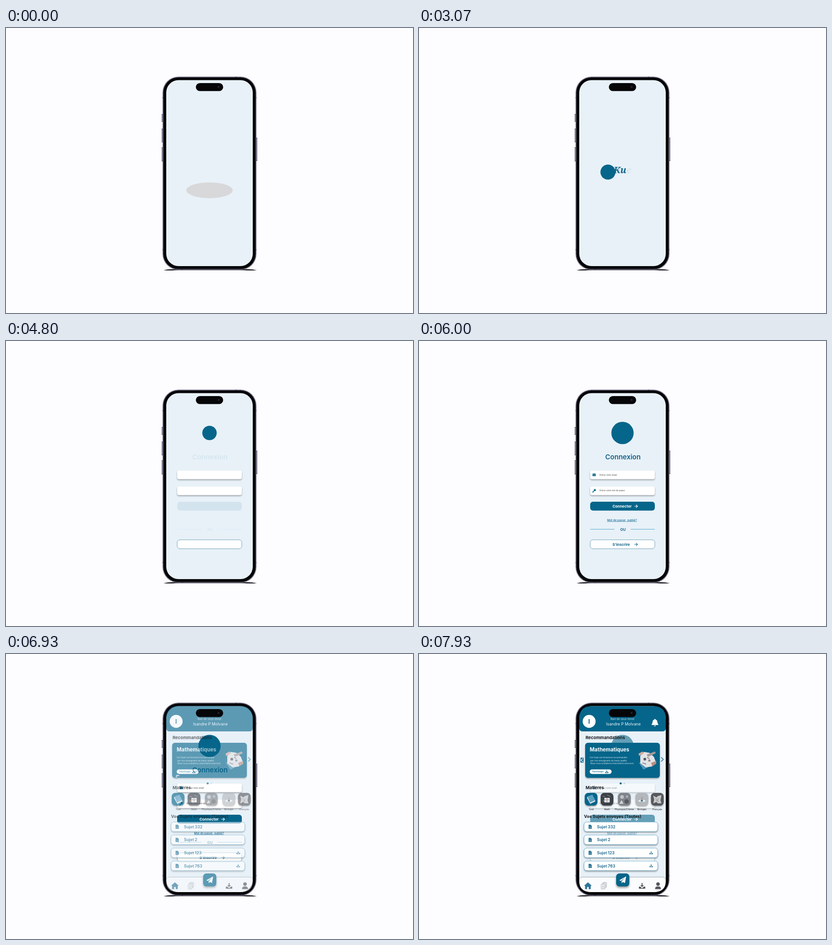
Animation, 894 px wide and 626 px high, one loop 8000 ms. Source, as an HTML page:

```html
<!DOCTYPE html>
<html lang="fr">
<head>
<meta charset="utf-8">
<title>Application mobile</title>
<style>
  html, body { margin: 0; width: 100%; height: 100%; overflow: hidden; background: #fdfcff; }
  svg { display: block; font-family: Inter, "Open Sans", sans-serif; }
  .soft { filter: drop-shadow(0 2px 1.5px #0005); }
  .script { font: italic bold 20px "Noto Serif", serif; fill: #14688e; }
</style>
</head>
<body>
<svg id="stage" width="894" height="626" viewBox="0 0 894 626"></svg>
<script>
const BLUE = '#06658a', INK = '#16181c', LOOP = 8000;
const stage = document.getElementById('stage');

// Markup helpers
const text = (x, y, size, weight, fill, str, anchor = 'start', extra = '') =>
  `<text x="${x}" y="${y}" font-size="${size}" font-weight="${weight}" fill="${fill}" text-anchor="${anchor}" ${extra}>${str}</text>`;
const rect = (x, y, w, h, r, fill, extra = '') =>
  `<rect x="${x}" y="${y}" width="${w}" height="${h}" rx="${r}" fill="${fill}" ${extra}/>`;
const circle = (x, y, r, fill, extra = '') =>
  `<circle cx="${x}" cy="${y}" r="${r}" fill="${fill}" ${extra}/>`;
const path = (d, fill, extra = '') => `<path d="${d}" fill="${fill}" ${extra}/>`;
const line = (d, stroke, width, extra = '') =>
  path(d, 'none', `stroke="${stroke}" stroke-width="${width}" ${extra}`);
const at = (x, y, scale, body) => `<g transform="translate(${x} ${y}) scale(${scale})">${body}</g>`;

// Icons, drawn around their own centre
const arrow = (x, y, color) =>
  line(`M${x} ${y}h6.5m-3-3l3 3l-3 3`, color, 1.1, 'stroke-linecap="round" stroke-linejoin="round"');
const download = (x, y, scale, color) => at(x, y, scale,
  path('M-1-6h2v5h3l-4 4l-4-4h3z', color) + path('M-7 2h3l4 3.5l4-3.5h3v4.5h-14z', color));
const documentIcon = (x, y) =>
  path(`M${x - 3.5} ${y - 4.5}h4.5l2.5 2.5v6.5h-7z`, '#2d7698') +
  line(`M${x - 1.8} ${y + .5}h3.6m-3.6 1.8h3.6`, '#d5e5ee', .5);

const phone = `
  ${path('M346 532Q358 529 372 530H522Q538 529 551 532Q538 533 522 532H372Q358 533 346 532z', '#15141c')}
  ${[[342, 189, 17], [342, 221, 30], [342, 262, 31], [549, 241, 51]].map(([x, y, h]) =>
    rect(x, y, 3, h, 1, '#77758a') + rect(x, y, 3, 1, 0, '#25242e') + rect(x, y + h - 1, 3, 1, 0, '#25242e')).join('')}
  ${rect(343.8, 106.8, 206.4, 424.4, 35, '#7b798d')}
  ${rect(345.6, 108.6, 202.8, 420.8, 33, '#050508')}
  ${[[343.8, 152], [548.6, 152], [343.8, 486], [548.6, 486]].map(([x, y]) => rect(x, y, 1.6, 2, 0, '#3c3b48')).join('')}
  ${rect(504, 106.8, 2, 1.8, 0, '#3c3b48')}${rect(386, 529.4, 2, 1.8, 0, '#3c3b48')}
  ${rect(352, 114.5, 190, 408.5, 27, '#e8f1f8')}`;

const island = rect(417, 121, 60, 17.5, 8.75, '#060609') +
  circle(467, 129.7, 2.6, '#15151f') + circle(467, 129, .8, '#5a5a70');

const splash = `
  <ellipse id="shade" cx="447" cy="356.5" rx="51" ry="17.3" fill="#d8d8da"/>
  <g id="splash">
    <text id="wordEnd" class="script">Tive</text>
    <text id="wordStart" class="script">Ku</text>
    <circle id="badge" cy="316.5" r="16.5" fill="${BLUE}"/>
  </g>`;

const login = `<g id="login">
  <g id="boxes">
    ${rect(376, 284.5, 142, 19, 4, '#fff', 'class="soft"')}
    ${rect(376, 319.5, 142, 19, 4, '#fff', 'class="soft"')}
    ${rect(376, 436.7, 142, 19.6, 6, '#fff', 'stroke="#6f9fb8"')}
  </g>
  <circle id="logo" cx="447" cy="202" fill="${BLUE}"/>
  <g id="mainParts">
    ${text(448, 260, 15, 600, '#12628a', 'Connexion', 'middle')}
    ${rect(376, 353, 142, 19.6, 6, BLUE)}
    ${line('M376 413.5H429M465 413.5H518', '#55a6cd', 1)}
    ${text(448, 417, 8, 700, '#24688b', 'OU', 'middle')}
  </g>
  <g id="labels">
    ${rect(381, 291.2, 7.4, 5.6, 1, BLUE)}${line('M381 292.5l3.7 2.4l3.7-2.4', '#fff', .6)}
    ${circle(386.3, 327.3, 2.4, BLUE)}${line('M385 328.5l-3.4 3.2h2', BLUE, 1.5)}${circle(387, 326.6, .6, '#fff')}
    ${text(396.5, 296, 4.5, 400, '#444', 'Entrez votre email')}
    ${text(396.5, 330.2, 4.5, 400, '#444', 'Entrez votre mot de passe')}
    ${text(425, 366, 8.2, 700, '#fff', 'Connecter')}${arrow(473.5, 363, '#fff')}
    ${text(446, 395.5, 6.3, 500, '#176c95', 'Mot de passe&nbsp; oublié?', 'middle', 'text-decoration="underline"')}
    ${text(425, 449.6, 8.2, 700, '#176588', 'S’inscrire')}${arrow(473.5, 446.8, '#176588')}
  </g>
</g>`;

const subjects = [
  [378, BLUE, 'Tout', path('M-8-6l11-4l6 12l-11 5z', '#5a9fc0') + path('M-8-6l6 13l11-5v3l-11 5l-7-13z', '#d9e4ea')],
  [413, '#3b4148', 'Math', rect(-6, -3, 12, 10, 1, '#dfe1e4') + line('M-10-7l6 2m4-4l8 3M-9 5l4-4M0-3v9m-5-5h10', '#9b8880', 1.2)],
  [451, '#80848a', 'Physique/Chimie', circle(-5, -5, 4, '#bfc3c8') + circle(5, 5, 5, '#555b62') + circle(6, -6, 2.5, '#a3b8c6') + path('M-6 2l4 8h-9z', '#d4d6d9')],
  [489.5, '#b4b7bb', 'Biologie', path('M-9 4Q0-3 9 4Q0 8-9 4z', '#eef0f2') + circle(0, 3, 2.5, '#4f788e') + line('M-1-5l2 5', '#777', 1)],
  [523.5, '#57585d', 'Français', path('M-9-8l7 4l3-3l8-2l-2 11l2 7h-8l-3-3l-7 3l2-8z', '#c7c8ca') + line('M-4-2l7 8m0-8l-5 7', '#77797d', 1)]
].map(([x, color, label, art]) =>
  rect(x - 14, 305, 28, 28, 8, color, 'class="soft"') + at(x, 319, 1, art) +
  text(x, 343.4, 5.3, 400, INK, label, 'middle')).join('');

const topics = [332, 2, 123, 763].map((number, i) => {
  const y = 369 + i * 28.6;
  return rect(362.5, y, 162, 21, 6, '#fff', 'stroke="#62a5c6" stroke-width=".9" class="soft"') +
    documentIcon(376, y + 10.6) + text(391, y + 13.7, 8.7, 700, '#2d7698', 'Sujet ' + number) +
    (i > 1 ? download(510, y + 10, .55, '#2d7698') : '');
}).join('');

const mathArt = at(501, 231, 1,
  path('M-18 8l14-6l10 14l-14 7z', '#4d94b7') +
  path('M-15-7l8-9l12 2l10 9l4 11l-8 10l-14 2l-12-9z', '#e3e2e5') +
  path('M-1-10l18-7l2 4l-17 8z', '#a59a98') + path('M-19-12l9-5l3 4l-10 6z', '#cfaa9f') +
  path('M9 8l11-4v6l-9 6z', '#b78e82') + circle(-5, 0, 3, '#59585f') +
  circle(5, 3, 2.5, '#8a8890') + line('M-10 8l8 3m2-15l5 3', '#77767e', 1.5));

const home = `<g id="home">
  ${path('M352 142Q352 114.5 379 114.5H515Q542 114.5 542 142V163Q542 170 535 170H359Q352 170 352 163z', BLUE)}
  ${circle(373.7, 148, 14.2, '#fff')}${text(373.7, 153, 13.5, 700, '#17617f', 'I', 'middle')}
  ${text(447, 145, 5.9, 400, '#c9e0ea', 'Ravi de vous revoir', 'middle')}
  ${text(449, 157.3, 8.7, 400, '#eef7fb', 'Isandre P Molvane', 'middle')}
  ${text(366, 187, 9.5, 700, INK, 'Recommandations')}
  ${rect(365, 195, 164, 77, 6, BLUE, 'class="soft"')}
  ${text(375, 214, 11.4, 700, '#fff', 'Mathematiques')}
  ${text(375, 229, 4.6, 400, '#d7e8ef', 'Cet Sujet est fortement recommandée')}
  ${text(376.5, 235.6, 4.6, 400, '#d7e8ef', 'par nos enseignants de haute qualité.')}
  ${text(376.5, 242.2, 4.5, 400, '#d7e8ef', 'Nous vous souhaitons d’excellents exercices')}
  ${rect(375, 253.5, 48, 10, 5, '#fff')}
  ${text(379.5, 260, 4.6, 500, BLUE, 'Telecharger')}${download(412.5, 258.2, .5, BLUE)}
  ${mathArt}
  ${line('M532 226.8l4.6 4.7l-4.6 4.7', '#2878a0', 1.7)}
  ${circle(443, 284.3, 2.3, BLUE)}${circle(451, 284.3, 2, '#cbd9e2')}
  ${text(366, 297.2, 9.4, 700, INK, 'Matieres')}
  ${subjects}
  ${text(362.5, 359.5, 9.1, 700, INK, 'Vos Sujets envoyes (Toutes)')}
  ${topics}
  ${path('M352 499Q352 491 360 491H534Q542 491 542 499Q542 523 515 523H379Q352 523 352 499z', '#fbfcfe', 'style="filter:drop-shadow(0 -1px 1.5px #0004)"')}
  ${path('M371 501.5l8.5 7.5h-2.3v7.5h-4.4v-4.8h-3.6v4.8h-4.4v-7.5h-2.3z', '#2d7698')}
  ${[4, 2, 0].map(d => rect(400 + d, 505.5 - d, 8, 11, 1, '#eceef0', 'stroke="#a9acb1" stroke-width=".8"')).join('')}
  ${line('M402 509h4m-4 2.5h4m-4 2.5h4', '#b5b8bc', .8)}
  ${rect(433, 482, 29, 28.5, 7, BLUE, 'style="filter:drop-shadow(0 3px 2px #0006)"')}
  ${path('M440 497l15-8.5l-2.5 14.5l-5-2.3l-2.5 3v-4.4l7-7.8l-8.5 7z', '#fff')}
  ${download(490, 509, 1, '#55565c')}
  ${circle(525, 505.3, 3.9, '#55565c')}${path('M518.5 516.5q0-6 5-6h3q5 0 5 6z', '#55565c')}
  <g id="previous">${rect(-3.5, -5.5, 7, 11, 0, '#1f7096')}${line('M2-4l-4 4l4 4', '#e3eff5', 1.5)}</g>
  <path id="bell" d="M0-9q1.3 0 1.3 1.6q4.2 1 4.2 6q0 3 2 5v1.4h-15v-1.4q2-2 2-5q0-5 4.2-6q0-1.6 1.3-1.6zM-2 6h4q-.5 2-2 2t-2-2z"/>
</g>`;

stage.innerHTML = phone + splash + login + home + island;
const el = Object.fromEntries([...stage.querySelectorAll('[id]')].map(node => [node.id, node]));

// Motion helpers
const clamp = v => Math.min(1, Math.max(0, v));
const mix = (a, b, p) => a + (b - a) * p;
const smooth = (t, start, length) => {
  const p = clamp((t - start) / length);
  return p * p * (3 - 2 * p);
};
const spring = (t, start) => {
  const s = Math.max(0, t - start - 25) / 1000;
  return 1 - Math.exp(-7.5 * s) * (Math.cos(6.61 * s) + 1.134 * Math.sin(6.61 * s));
};
const fade = (node, p) => {
  node.style.opacity = clamp(p);
  node.style.display = p > 0 ? '' : 'none';
};
const move = (node, x, y, scale = 1, angle = 0) =>
  node.setAttribute('transform', `translate(${x} ${y}) rotate(${angle}) scale(${scale})`);

function draw(t) {
  const reveal = smooth(t, 900, 430), slide = spring(t, 2130), spread = spring(t, 3000);
  const open = smooth(t, 3990, 680), grow = spring(t, 4730), fill = smooth(t, 5570, 430);
  const enter = spring(t, 6730), settle = spring(t, 7600);

  fade(el.shade, 1 - reveal);
  fade(el.splash, reveal * (1 - open));
  el.badge.setAttribute('cx', mix(447, 415, slide));
  fade(el.wordStart, slide);
  move(el.wordStart, mix(mix(436, 427, slide), 433, spread), mix(318, 325, spread));
  fade(el.wordEnd, spread);
  move(el.wordEnd, mix(420, 463, spread), mix(318, 325, spread));

  fade(el.login, 1 - .42 * clamp((t - 7600) / 330));
  fade(el.boxes, open);
  el.logo.setAttribute('r', Math.max(0, mix(15 * open, 24.5, grow)));
  fade(el.mainParts, grow);
  fade(el.labels, fill);

  fade(el.home, enter);
  move(el.previous, mix(376, 357, settle), mix(268, 231, settle), 1, mix(50, 0, settle));
  move(el.bell, mix(443, 523, settle), mix(251, 145, settle), mix(.6, 1, settle));
  el.bell.style.fill = `color-mix(in srgb, white ${100 * clamp(settle * 1.1)}%, ${BLUE})`;
}

const begin = performance.now();
function tick() {
  draw((performance.now() - begin) % LOOP);
  requestAnimationFrame(tick);
}
tick();
</script>
</body>
</html>
```
